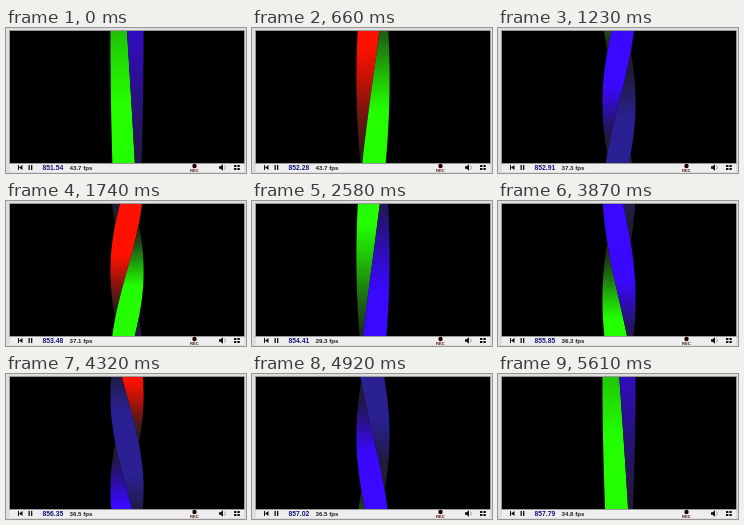
Animation, 240 px wide and 145 px high, one loop 5640 ms. Source, as an HTML page with a canvas:

```html
<!DOCTYPE html>
<html lang="en">
<head>
<meta charset="utf-8">
<title>Twister</title>
<style>
  html, body { margin: 0; width: 100%; height: 100%; overflow: hidden; background: #dedede; }
  canvas { position: absolute; left: 4px; top: 3px; background: #000; }
  svg { position: absolute; left: 0; top: 0; }
  text { font: bold 6.8px "Liberation Sans", Arial, sans-serif; }
</style>
</head>
<body>
<canvas width="234" height="132"></canvas>
<svg width="240" height="145">
  <rect x="4" y="135" width="234" height="9" fill="#eee"/>
  <path d="M3.5 135.5v-133h235v133z" fill="none" stroke="#999"/>
  <path d="M12 137h1v5h-1zM16.5 137v5l-3.5-2.5zM22.5 137h1.3v5h-1.3zM25 137h1.3v5H25z" fill="#111"/>
  <text id="clock" x="36.5" y="142" fill="#16167c"></text>
  <text id="rate" x="63.5" y="142" fill="#222" style="font-size:6.2px"></text>
  <circle cx="188.5" cy="138" r="2.2" fill="#200"/>
  <text x="184" y="143.5" fill="#511" style="font-size:4.2px">REC</text>
  <path d="M213 138.3h1.5l2.5-2v6.4l-2.5-2H213z" fill="#111"/>
  <path d="M218.5 137.5q1.8 2 0 4" fill="none" stroke="#777" stroke-width=".7"/>
  <path d="M228 137h2.4v2H228zM231.4 137h2.4v2h-2.4zM228 140h2.4v2H228zM231.4 140h2.4v2h-2.4z" fill="#111"/>
</svg>
<script>
const LOOP = 5640, STEP = 30, TURN = 2 * Math.PI, DEG = Math.PI / 180;
const CENTER = 117, RADIUS = 16.6, HEIGHT = 132;
const ctx = document.querySelector('canvas').getContext('2d');
const clock = document.getElementById('clock'), rate = document.getElementById('rate');

// Red, green, blue and dim blue sides, each a quarter turn apart
const sides = [[255, 16, 0], [35, 255, 0], [58, 8, 255], [42, 32, 148]];

// Time in ms, middle angle in degrees, speed in degrees per radian of the loop, fps
const keys = [
  [0, -31, -85, 43.7], [1230, 230, 350, 37.3], [1740, 406, 355, 37.1],
  [2580, 669, 160, 29.3], [3360, 710, -140, 36.3], [4320, 540, -368, 36.5],
  [5610, -28, -95, 34.8], [LOOP, -31, -85, 43.7]
];

function middleAngle(ms, i) {
  const [t0, a0, v0] = keys[i], [t1, a1, v1] = keys[i + 1];
  const u = (ms - t0) / (t1 - t0), span = (t1 - t0) / LOOP * TURN;
  const ease = u * u * (3 - 2 * u);
  return a0 + (a1 - a0) * ease + span * u * (1 - u) * (v0 * (1 - u) - v1 * u);
}

// Sides turned away fade to a dim gray
function shade(color, light) {
  const gray = 34 * (1 - light);
  return `rgb(${color.map(c => Math.round(gray + c * light ** 1.5))})`;
}

function drawBar(ms, middle) {
  const twist = 128 * Math.sin(ms / LOOP * TURN + 2.92);
  ctx.clearRect(0, 0, 234, HEIGHT);
  for (let y = 0; y < HEIGHT; y++) {
    const angle = middle + twist * ((y + .5) / HEIGHT - .5);
    sides.forEach((color, i) => {
      const facing = (angle + (i - 1) * 90) * DEG;
      const light = Math.min(1, 1.15 * Math.cos(facing));
      if (light <= 0) return;
      const left = RADIUS * Math.sin(facing - Math.PI / 4);
      const right = RADIUS * Math.sin(facing + Math.PI / 4);
      ctx.fillStyle = shade(color, light);
      ctx.fillRect(CENTER + left, y, right - left, 1);
    });
  }
}

const start = performance.now();

function frame() {
  const ms = Math.floor((performance.now() - start) % LOOP / STEP) * STEP;
  const i = keys.findIndex(k => k[0] > ms) - 1;
  drawBar(ms, middleAngle(ms, i));
  clock.textContent = (851.54 + ms / LOOP * TURN).toFixed(2);
  rate.textContent = keys[i][3].toFixed(1) + ' fps';
  requestAnimationFrame(frame);
}
frame();
</script>
</body>
</html>
```
